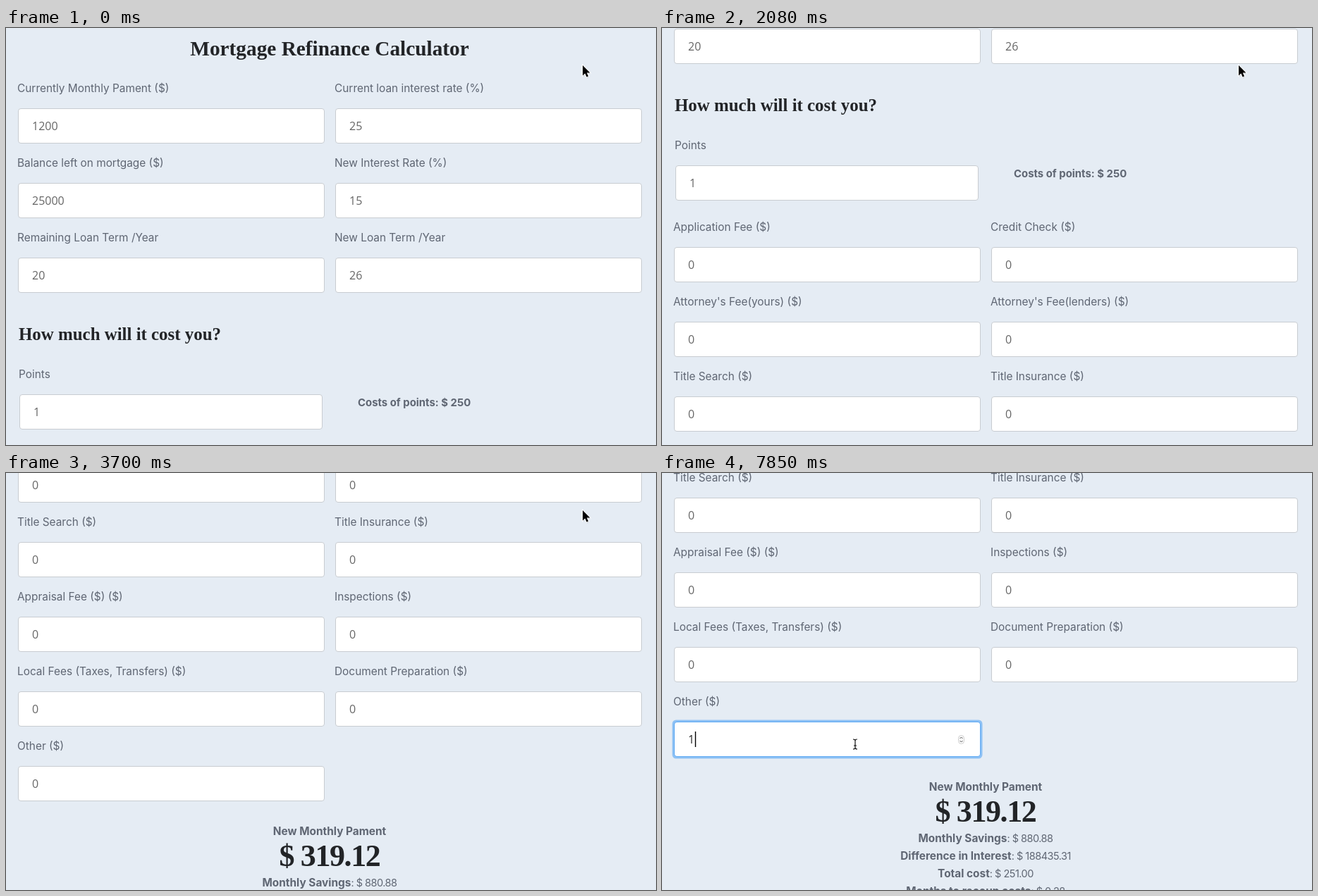
An HTML page that plays this animation: 922 px wide and 592 px high, repeating every 7.99 s.

```html
<!DOCTYPE html>
<html lang="en">
<head>
<meta charset="utf-8">
<title>Mortgage Refinance Calculator</title>
<style>
html, body { margin: 0; width: 100%; height: 100%; overflow: hidden; background: #e5ecf4; }
svg { display: block; }
text { white-space: pre; }
.label { font: 400 15.4px Inter, sans-serif; fill: #5f6673; }
.bold { font: 700 15.4px Inter, sans-serif; fill: #5f6673; }
.cost { font-size: 14.9px; }
.tail { font-size: 14.5px; font-weight: 400; letter-spacing: -.5px; }
.value { font: 400 16px "Open Sans", sans-serif; fill: #666; }
.head { font: 700 29.3px "Liberation Serif", serif; fill: #222427; }
.sub { font-size: 24.9px; }
.amount { font-size: 44px; letter-spacing: -1.4px; }
.mid { text-anchor: middle; }
.box { fill: #fff; stroke: #c8ccd1; }
.focus .value { fill: #2b2b2b; }
.focus .box { stroke: #57a5f3; filter: drop-shadow(0 0 1px #4c9ff2); }
.ring { fill: none; stroke: #7db9f6; stroke-width: 3; opacity: .8; }
</style>
</head>
<body>
<svg width="922" height="592" viewBox="0 0 922 592">
  <g id="page"></g>
  <g id="arrow">
    <path d="M0 0V14.6L3.4 11.4 5.6 16.5 8 15.5 5.8 10.5H10.4Z" transform="translate(.6 1.4)" fill="#000" opacity=".22"/>
    <path d="M0 0V14.6L3.4 11.4 5.6 16.5 8 15.5 5.8 10.5H10.4Z" stroke="#fff" stroke-width="1.8" paint-order="stroke"/>
  </g>
  <g id="beam" fill="none">
    <path d="M-3-7Q0-7 0-5Q0-7 3-7M0-5V5M-3 7Q0 7 0 5Q0 7 3 7M-2 2H2" stroke="#fff" stroke-width="3"/>
    <path d="M-3-7Q0-7 0-5Q0-7 3-7M0-5V5M-3 7Q0 7 0 5Q0 7 3 7M-2 2H2" stroke="#111" stroke-width="1.2"/>
  </g>
</svg>
<script>
const LOOP = 7990, LEFT = 17, RIGHT = 467, CENTER = 459;
const page = document.getElementById('page');
const arrow = document.getElementById('arrow');
const beam = document.getElementById('beam');

function add(tag, attrs, text = '', parent = page) {
  const el = document.createElementNS('http://www.w3.org/2000/svg', tag);
  for (const key in attrs) el.setAttribute(key, attrs[key]);
  el.textContent = text;
  return parent.appendChild(el);
}
const write = (cls, x, y, text) => add('text', { class: cls, x, y }, text);

function field(x, y, label, value, width = 435) {
  write('label', x - 1, y - 23, label);
  const g = add('g', {});
  add('rect', { class: 'box', x: x + .5, y: y + .5, width: width - 1, height: 49, rx: 3.5 }, '', g);
  g.value = add('text', { class: 'value', x: x + 20, y: y + 31 }, value, g);
  return g;
}

function pairs(top, rows) {
  rows.forEach(([a, b, va = '0', vb = '0'], i) => {
    field(LEFT, top + i * 106, a, va);
    field(RIGHT, top + i * 106, b, vb);
  });
}

function result(y, name, amount) {
  const line = write('bold mid', CENTER, y, name);
  return add('tspan', { class: 'tail' }, ': $ ' + amount, line);
}

write('head mid', CENTER, 39, 'Mortgage Refinance Calculator');
pairs(114, [
  ['Currently Monthly Pament ($)', 'Current loan interest rate (%)', '1200', '25'],
  ['Balance left on mortgage ($)', 'New Interest Rate (%)', '25000', '15'],
  ['Remaining Loan Term /Year', 'New Loan Term /Year', '20', '26']
]);
write('head sub', 18, 443, 'How much will it cost you?');
field(19, 520, 'Points', '1', 430);
write('bold cost', 499, 537, 'Costs of points: $ 250');
pairs(636, [
  ['Application Fee ($)', 'Credit Check ($)'],
  ["Attorney's Fee(yours) ($)", "Attorney's Fee(lenders) ($)"],
  ['Title Search ($)', 'Title Insurance ($)'],
  ['Appraisal Fee ($) ($)', 'Inspections ($)'],
  ['Local Fees (Taxes, Transfers) ($)', 'Document Preparation ($)']
]);
const other = field(LEFT, 1166, 'Other ($)', '0');
const ring = add('rect', { class: 'ring', x: 16, y: 1165, width: 437, height: 52, rx: 4 });
const caret = add('rect', { y: 1180, width: 1.4, height: 22, fill: '#000' });
const spinner = add('g', {});
add('rect', { x: 420.5, y: 1185.5, width: 8, height: 12, rx: 4, fill: '#fafafa', stroke: '#cfcfcf' }, '', spinner);
add('path', { d: 'M422.5 1190l2-2 2 2M422.5 1193l2 2 2-2', fill: 'none', stroke: '#555' }, '', spinner);

write('bold mid', CENTER, 1264, 'New Monthly Pament');
write('head amount mid', CENTER, 1308, '$ 319.12');
result(1337, 'Monthly Savings', '880.88');
result(1362, 'Difference in Interest', '188435.31');
const total = result(1387, 'Total cost', '250.00');
result(1412, 'Months to recoup costs', '0.28');

// Each list holds [start time, values...]; a value stays until the next start.
const scroll = [
  [0, 0], [1050, 23], [1200, 68], [1340, 118], [1490, 168], [1640, 214], [1780, 258], [1930, 298], [2080, 325],
  [2370, 355], [2520, 435], [2660, 510], [2810, 580], [2960, 632], [3110, 665],
  [3700, 750], [3850, 772], [4150, 792], [4300, 802], [5770, 812], [5920, 813]
];
const pointer = [
  [0, 818, 53], [4590, 735, 125], [4740, 580, 255], [4890, 430, 365], [5030, 344, 412],
  [5320, 417, 410], [5470, 342, 453], [6060, 325, 432], [6210, 295, 398], [6360, 274, 385]
];
const entry = [[0, '0', '250.00'], [7550, '', 'NaN'], [7850, '1', '251.00']];
const at = (list, t) => list.findLast(step => step[0] <= t);
const show = (el, on) => el.setAttribute('visibility', on ? 'visible' : 'hidden');

function draw(now) {
  const t = now % LOOP;
  const [, x, y] = at(pointer, t);
  const [, value, cost] = at(entry, t);
  const hover = t >= 6210, focused = t >= 6510;

  page.setAttribute('transform', `translate(0 ${-at(scroll, t)[1]})`);
  for (const el of [arrow, beam]) el.setAttribute('transform', `translate(${x} ${y})`);
  show(arrow, !hover);
  show(beam, hover);
  show(spinner, hover);
  show(ring, focused);
  show(caret, focused && (t < 7110 || t >= 7550));
  caret.setAttribute('x', value ? 46.8 : 37.8);
  other.classList.toggle('focus', focused);
  other.value.textContent = value;
  total.textContent = ': $ ' + cost;
}

const start = performance.now();
function tick() {
  draw(performance.now() - start);
  requestAnimationFrame(tick);
}
tick();
</script>
</body>
</html>
```
